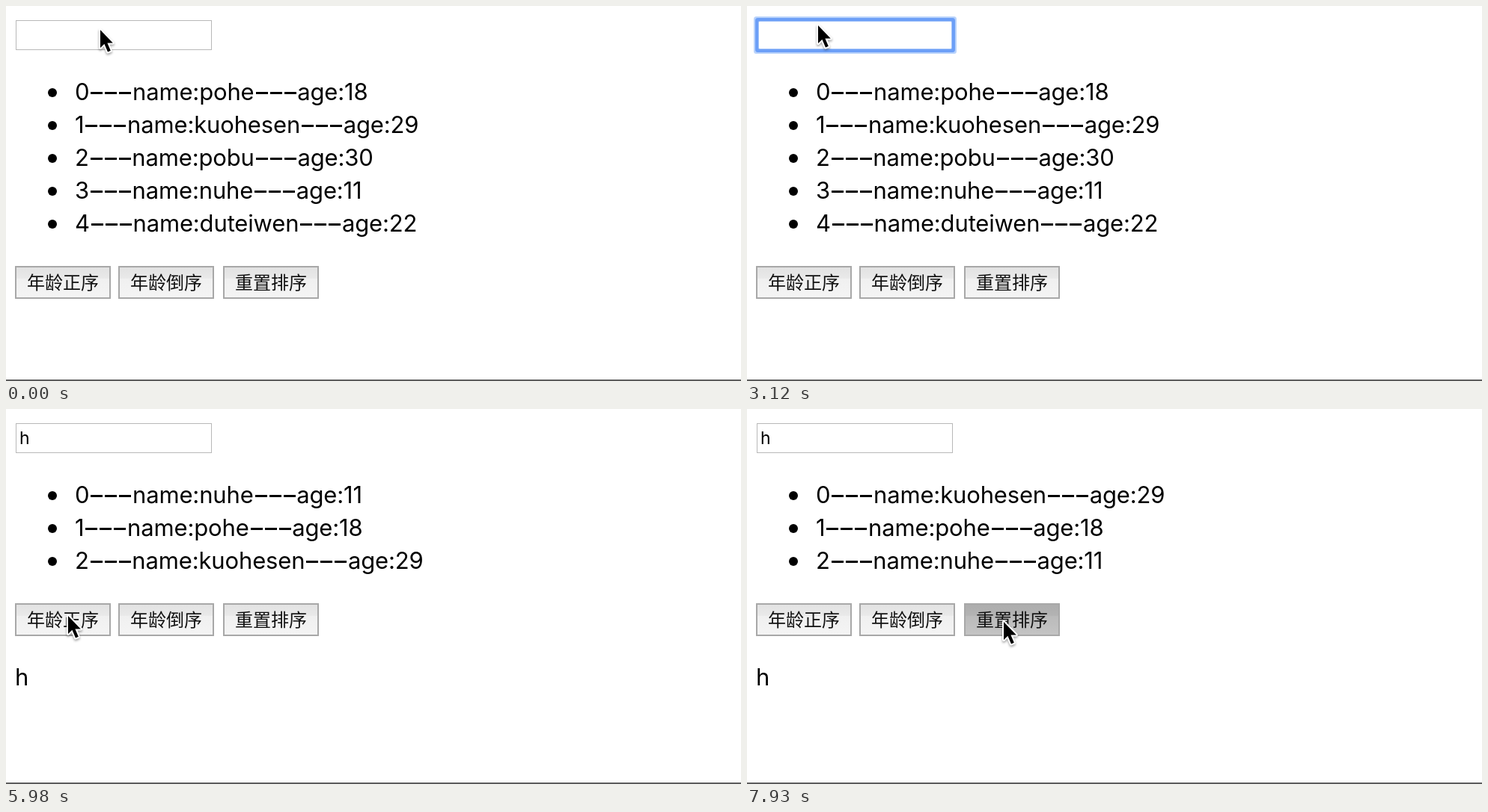
An HTML page that plays this animation: 982 px wide and 502 px high, repeating every 8 s.

```html
<!DOCTYPE html>
<html lang="zh">
<head>
<meta charset="utf-8">
<title>Filter and sort</title>
<style>
  html, body { margin: 0; width: 100%; height: 100%; overflow: hidden; background: #fff; }
  #stage { position: relative; width: 982px; height: 502px; overflow: hidden; color: #000;
    font: 31px/44px Inter, sans-serif; letter-spacing: -.15px; white-space: nowrap; }
  #stage > * { position: absolute; }
  #field { left: 13px; top: 19px; width: 260px; height: 38px; border: 1px solid #b8b8b8; background: #fff; }
  #ring { left: 16px; top: 21px; width: 257px; height: 36px; background: #fff; border-radius: 1px;
    box-shadow: 0 0 0 1px #a5c5f9, 0 0 0 5px #6c9ff7, 0 0 0 7px #b9d3fb; }
  #typed { left: 18px; top: 24px; font-size: 23px; line-height: 30px; }
  #caret { top: 24px; width: 2px; height: 30px; background: #000; }
  #list { left: 0; top: 93px; margin: 0; padding: 0 0 0 92px; list-style: none; }
  #list li { position: relative; height: 44px; }
  #list li::before { content: ""; position: absolute; left: -36px; top: 17px;
    width: 12px; height: 12px; border-radius: 50%; background: #000; }
  .dash { display: inline-block; width: 57.6px; height: 3px; overflow: hidden; vertical-align: 8px;
    font-size: 1px; line-height: 1px; color: transparent;
    background: repeating-linear-gradient(90deg, transparent 0 1.6px, #000 1.6px 17.6px, transparent 17.6px 19.2px); }
  .button { box-sizing: border-box; width: 128px; height: 44px; border: 2px solid #a8a8a8;
    background: linear-gradient(#e2e2e2, #e9e9e9 36%, #f0f0f0 37%, #f4f4f4);
    font: 24px/37px "Noto Sans CJK SC", "Noto Sans CJK", sans-serif; letter-spacing: 0;
    text-align: center; color: #111; }
  .button.down { background: linear-gradient(#adadad, #b3b3b3 36%, #bababa 37%, #c4c4c4); }
  #echo { left: 12px; top: 337px; }
  #rule { left: 0; top: 500px; width: 982px; height: 2px; background: #5c5c5c; }
  #pointer { left: 0; top: 0; width: 30px; height: 44px; overflow: visible;
    filter: drop-shadow(0 2px 1.5px rgba(0, 0, 0, .35)); }
</style>
</head>
<body>
<div id="stage">
  <div id="field"></div>
  <div id="ring"></div>
  <div id="typed">h</div>
  <div id="caret"></div>
  <ul id="list"></ul>
  <div class="button" style="left:12px">年龄正序</div>
  <div class="button" style="left:150px">年龄倒序</div>
  <div class="button" style="left:290px">重置排序</div>
  <div id="echo">h</div>
  <div id="rule"></div>
  <svg id="pointer"><path d="M0 0V24L5.4 18.8L10 29.5L13.8 27.8L9.4 17.4H16.8Z"
    fill="#000" stroke="#fff" stroke-width="4" stroke-linejoin="round" paint-order="stroke"/></svg>
</div>
<script>
const LOOP = 8000, STEP = 130;
const FOCUS = 2210, TYPE = 3770, BLUR = 5850;

const people = [['pohe', 18], ['kuohesen', 29], ['pobu', 30], ['nuhe', 11], ['duteiwen', 22]];
const matches = people.filter(([name]) => name.includes('h'));
const byAge = (a, b) => a[1] - b[1];
const lists = [
  [0, people],
  [TYPE, matches],
  [5980, [...matches].sort(byAge)],
  [7020, [...matches].sort(byAge).reverse()]
];
// Each press: start, end, button index
const presses = [[5850, 5980, 0], [6890, 7020, 1], [7930, LOOP, 2]];
const blinks = [[2340, true], [2860, false], [3250, true], [4290, false], [4810, true], [5330, false]];
// Pointer stops: time, x, y
const path = [
  [0, 126, 32], [390, 95, 26], [5070, 95, 26], [5590, 83, 277], [6110, 83, 277],
  [6760, 205, 284], [7150, 205, 284], [7800, 343, 285], [LOOP, 343, 285]
];

const el = id => document.getElementById(id);
const buttons = [...document.querySelectorAll('.button')];
const show = (node, on) => { node.style.visibility = on ? 'visible' : 'hidden'; };
const latest = (table, t) => table.filter(row => row[0] <= t).pop();
const dash = '<span class="dash">---</span>';
const ease = p => p * p * (3 - 2 * p);

function pointerAt(t) {
  const i = path.findIndex((stop, n) => n > 0 && t <= stop[0]);
  const [a, b] = [path[i - 1], path[i]];
  const p = ease((t - a[0]) / (b[0] - a[0]));
  return [a[1] + (b[1] - a[1]) * p, a[2] + (b[2] - a[2]) * p];
}

let shown;
function showList(rows) {
  if (rows === shown) return;
  shown = rows;
  el('list').innerHTML = rows.map(([name, age], i) =>
    `<li>${i}${dash}name:${name}${dash}age:${age}</li>`).join('');
  buttons.forEach(b => { b.style.top = 128 + rows.length * 44 + 'px'; });
}

function render(time) {
  const t = Math.floor(time / STEP) * STEP;
  const focused = t >= FOCUS && t < BLUR;
  const typed = t >= TYPE;

  showList(latest(lists, t)[1]);
  show(el('ring'), focused);
  el('ring').style.opacity = Math.min(1, .6 + (t - FOCUS) / 325);
  show(el('typed'), typed);
  show(el('echo'), typed);

  const blink = latest(blinks, t);
  show(el('caret'), focused && blink && blink[1]);
  el('caret').style.left = (typed ? 32 : 18) + 'px';

  buttons.forEach((b, i) => b.classList.toggle('down',
    presses.some(([from, to, n]) => n === i && t >= from && t < to)));

  const [x, y] = pointerAt(t);
  show(el('pointer'), t < TYPE || t >= 5200);
  el('pointer').style.transform = `translate(${x}px, ${y}px)`;
}

const start = performance.now();
function tick() {
  render((performance.now() - start) % LOOP);
  requestAnimationFrame(tick);
}
tick();
</script>
</body>
</html>
```
